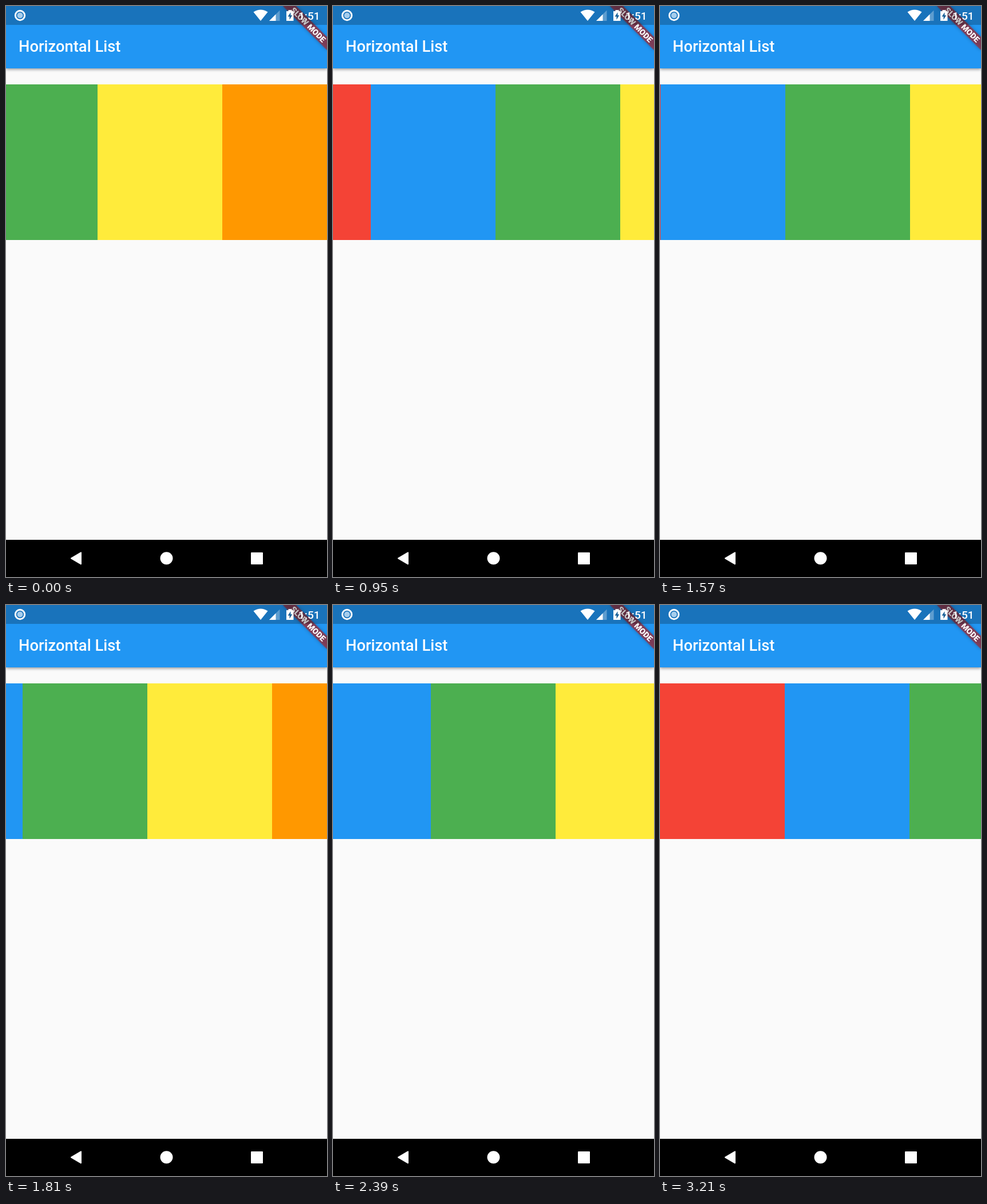
These frames come from a looping animation (561 by 998 pixels, 3510 ms). An HTML page:

```html
<!DOCTYPE html>
<html lang="en">
<head>
<meta charset="utf-8">
<title>Horizontal List</title>
<style>
  html, body { margin: 0; width: 100%; height: 100%; overflow: hidden; background: #fafafa; }
  svg { position: absolute; left: 0; top: 0; display: block; }
  text { font-family: Roboto, Inter, sans-serif; fill: #fff; }
  .bar { filter: drop-shadow(0 2px 2.5px rgba(0, 0, 0, .38)); }
  .banner { filter: drop-shadow(0 0 3px rgba(0, 0, 0, .4)); }
</style>
</head>
<body>
<svg width="561" height="998" viewBox="0 0 561 998">
  <defs>
    <clipPath id="view"><rect y="137" width="561" height="272"/></clipPath>
  </defs>

  <rect width="561" height="998" fill="#fafafa"/>

  <g clip-path="url(#view)">
    <g id="list">
      <rect x="0" y="137" width="218" height="272" fill="#f44336"/>
      <rect x="218" y="137" width="218" height="272" fill="#2196f3"/>
      <rect x="436" y="137" width="218" height="272" fill="#4caf50"/>
      <rect x="654" y="137" width="218" height="272" fill="#ffeb3b"/>
      <rect x="872" y="137" width="218" height="272" fill="#ff9800"/>
    </g>
    <ellipse id="glow" cy="273" ry="408" fill="#2196f3" opacity="0"/>
  </g>

  <rect class="bar" width="561" height="109" fill="#2196f3"/>
  <text x="22" y="80" font-size="27.3" font-weight="500">Horizontal List</text>

  <g transform="translate(561 0) rotate(45)">
    <rect class="banner" x="-54.5" y="38.2" width="109" height="16.4" fill="#b71c1c" fill-opacity=".63"/>
    <text y="51.4" font-size="13.9" font-weight="900" text-anchor="middle">SLOW MODE</text>
  </g>

  <!-- status bar -->
  <rect width="561" height="33" fill="#000" fill-opacity=".23"/>
  <circle cx="24.5" cy="16.5" r="8.2" fill="none" stroke="#fff" stroke-width="3"/>
  <circle cx="24.5" cy="16.5" r="5" fill="#a6cdec"/>
  <g fill="#fff">
    <path d="M445 26 L432.5 10.6 Q445 2.6 457.5 10.6 Z"/>
    <path d="M460 26 L478.5 7.500 V26 Z" fill-opacity=".3"/>
    <path d="M460 26 L471.500 14.500 V26 Z"/>
    <path d="M493.500 7 H498.500 V9 H502.500 V26 H490 V9 H493.500 Z"/>
  </g>
  <path d="M497.500 11 L492.500 18.500 H495.500 V24 L500.300 16.200 H497.500 Z" fill="#1b6299"/>
  <text x="511" y="23.500" font-size="19.1" font-weight="500">1:51</text>

  <!-- navigation bar -->
  <rect y="933" width="561" height="65" fill="#000"/>
  <g fill="#fff" stroke="#fff" stroke-width="2" stroke-linejoin="round">
    <path d="M114 965.300 L131 955.300 V975.300 Z"/>
    <circle cx="280.500" cy="965.300" r="10"/>
    <rect x="429" y="956" width="19" height="19"/>
  </g>
</svg>

<script>
  const LOOP = 3510, FIRST = 50, STEP = 40.9;

  // [step, scroll offset]
  const knots = [
    [0, 494], [11, 409], [23, 152], [30, 88], [38, 217], [49, 508],
    [51, 508], [52, 505], [63, 33], [65, 0], [90, 0]
  ];

  const slopes = knots.slice(1).map(([x, y], i) => (y - knots[i][1]) / (x - knots[i][0]));

  // Harmonic mean of neighbouring slopes keeps each stretch free of overshoot.
  const tangents = knots.map((_, i) => {
    const a = slopes[i - 1] || 0, b = slopes[i] || 0;
    return a * b > 0 ? 2 * a * b / (a + b) : 0;
  });

  function scrollAt(step) {
    const i = knots.findIndex((k, n) => n > 0 && step <= k[0]) - 1;
    const [x0, y0] = knots[i], [x1, y1] = knots[i + 1];
    const w = x1 - x0, u = (step - x0) / w, v = 1 - u;
    return y0 * (1 + 2 * u) * v * v + tangents[i] * w * u * v * v
         + y1 * u * u * (3 - 2 * u) - tangents[i + 1] * w * u * u * v;
  }

  // Edge glow: quick swell once the list hits its start, then a slow fade.
  function glowAt(step) {
    if (step <= 65 || step >= 78) return 0;
    return step < 69 ? (step - 65) / 4 : ((78 - step) / 9) ** 1.5;
  }

  const list = document.getElementById("list");
  const glow = document.getElementById("glow");

  function draw(now) {
    const t = now % LOOP;
    const step = t < FIRST ? 0 : 1 + Math.floor((t - FIRST) / STEP);
    list.setAttribute("transform", `translate(${-Math.round(scrollAt(step))} 0)`);

    const g = glowAt(step);
    glow.setAttribute("cx", -353 * g * .5);
    glow.setAttribute("rx", 408 * g * .5);
    glow.setAttribute("opacity", .3 * g);
  }

  const start = performance.now();
  function tick() {
    draw(performance.now() - start);
    requestAnimationFrame(tick);
  }
  tick();
</script>
</body>
</html>
```
